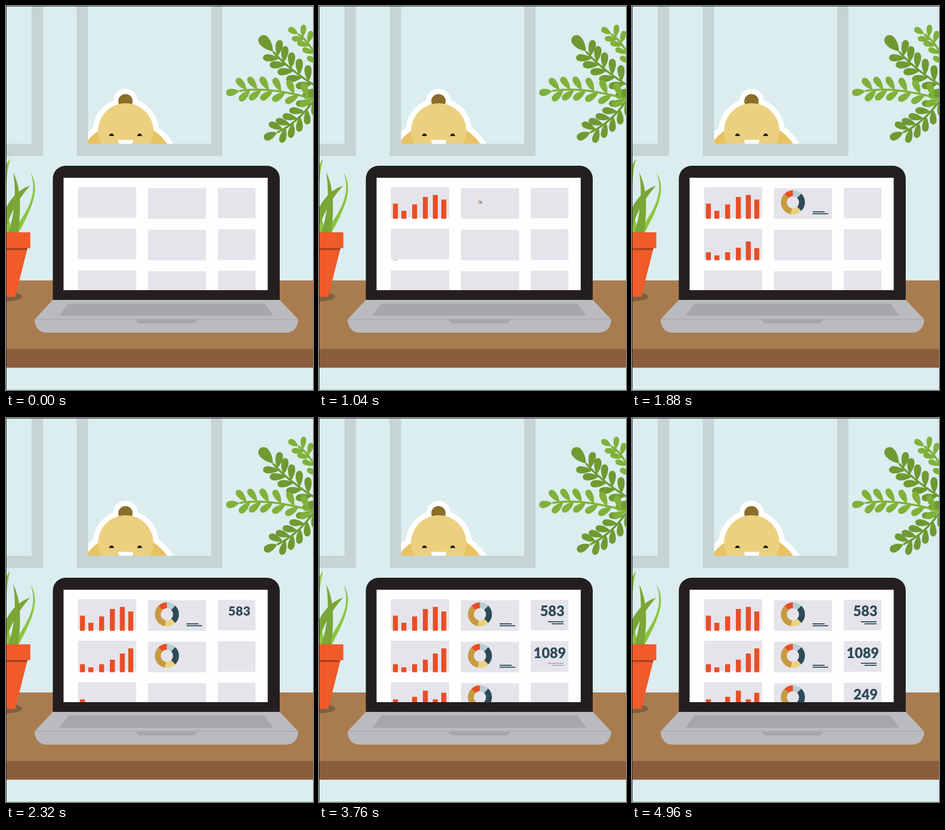
An HTML page for the animation above (5000 ms loop, 600 by 750 pixels).

```html
<!DOCTYPE html>
<html lang="en">
<head>
<meta charset="utf-8">
<title>Dashboard on a desk</title>
<style>
  html, body { margin: 0; width: 100%; height: 100%; overflow: hidden; background: #dbedef; }
  svg { display: block; width: 100vw; height: 100vh; }
  #dash text { font: 900 27.3px Lato, sans-serif; text-anchor: middle; fill: #2e4a59; }
  .bar, .pop { transform-box: fill-box; transform-origin: center; }
  .bar { transform-origin: bottom; fill: #e84e26; }
  .rule { stroke: #2e4a59; stroke-width: 2; fill: none; }
  .card { fill: #e5e4ea; }
</style>
</head>
<body>
<svg viewBox="0 0 600 750">
  <defs>
    <clipPath id="pane"><path d="M160.500 0H401V269H160.500Z"/></clipPath>
    <clipPath id="screen"><path d="M112.500 335.500H511.500V555H112.500Z"/></clipPath>
  </defs>
  <rect width="600" height="750" fill="#dbedef"/>

  <!-- windows -->
  <path fill="#c5d5d5" d="M50 0H72.500V293H0V269H50ZM138 0H160.500V269H401V0H423V293H138Z"/>

  <!-- visitor -->
  <g clip-path="url(#pane)">
    <g fill="#fff">
      <circle cx="234.500" cy="324" r="108"/>
      <circle cx="234" cy="244" r="64.500"/>
      <circle cx="233.500" cy="185.500" r="24"/>
    </g>
    <circle cx="235" cy="324" r="97" fill="#e8c262"/>
    <circle cx="233.500" cy="186" r="14" fill="#8a6e2a"/>
    <circle cx="234" cy="244" r="54" fill="#ecd080"/>
    <path fill="#231f20" d="M201.500 254a4.700 5 0 0 1 9.400 0ZM256.500 254a4.700 5 0 0 1 9.400 0Z"/>
    <path fill="#fff" d="M219 261.500H249Q247 277 234 277T219 261.500Z"/>
  </g>

  <g id="fern"></g>

  <!-- desk -->
  <path fill="#a97c50" d="M0 536H600V670H0Z"/>
  <path fill="#8b5d3c" d="M0 670H600V706.500H0Z"/>

  <!-- potted grass -->
  <ellipse cx="-5" cy="567.500" rx="37" ry="9.500" fill="#7f6040"/>
  <path fill="#8bc53f" d="M8 299Q1 322 1 356L0 358V312Q3 304 8 299ZM0 396Q7 420 12 442H0Z"/>
  <path fill="#7aa637" d="M47 351Q18 360 0 394V431Q17 384 47 351Z"/>
  <path fill="#8bc53f" d="M48 325C65 354 57 384 25 442H13C36 406 65 372 48 325Z"/>
  <path fill="#7aa637" d="M14 325C29 354 30 392 24 442H5C18 402 20 362 14 325Z"/>
  <path fill="#f15a29" d="M0 442H47.500V473H42L18 568H0Z"/>
  <path fill="#a5401f" d="M0 473H42L41 476.500H0Z"/>

  <!-- laptop -->
  <path fill="#231f20" d="M91.500 574V337A25 25 0 0 1 116.500 312H510A25 25 0 0 1 535 337V574Z"/>
  <path fill="#fffefe" d="M112.500 335.500H511.500V555H112.500Z"/>
  <path fill="#babbbf" d="M91.500 574H535L571 612V615Q568 638 546 638H81Q59 638 56 615V612Z"/>
  <path fill="#a6a7ab" d="M122 581H505L522.500 605H104Z"/>
  <path stroke="#a6a8ab" stroke-width="1.500" d="M56 612H571"/>
  <path fill="#a5a7aa" d="M254 612H373Q372 620 364 620H263Q255 620 254 612Z"/>

  <g id="dash" clip-path="url(#screen)"></g>

  <path fill="none" stroke="#222" d="M600 .5H.5V750"/>
  <path stroke="#aab6b7" d="M0 749.500H600"/>
</svg>

<script>
const LOOP = 5000, STEP = 1000, ROW = 81;
const DARK = '#6f9a32', LIGHT = '#80b13b';
const fern = document.getElementById('fern');
const dash = document.getElementById('dash');

function add(parent, tag, attrs, text) {
  const el = document.createElementNS('http://www.w3.org/2000/svg', tag);
  for (const k in attrs) el.setAttribute(k, attrs[k]);
  if (text) el.textContent = text;
  parent.append(el);
  return el;
}

// Moves a property between two values once per loop, holding before and after.
function reveal(el, prop, from, to, start, length, easing) {
  el.animate([
    { [prop]: from, offset: 0 },
    { [prop]: from, offset: start / LOOP, easing },
    { [prop]: to, offset: (start + length) / LOOP },
    { [prop]: to, offset: 1 }
  ], { duration: LOOP, iterations: Infinity });
}

function leaf(x, y, angle, l, w, fill) {
  add(fern, 'path', {
    fill,
    transform: `translate(${x} ${y}) rotate(${angle})`,
    d: `M0 0C${l * .2} ${-w * .5} ${l * .4} ${-w} ${l * .7} ${-w}` +
       `C${l * 1.1} ${-w} ${l * 1.1} ${w} ${l * .7} ${w}` +
       `C${l * .4} ${w} ${l * .2} ${w * .5} 0 0`
  });
}

// A quadratic stem from tip to root with staggered leaves on both sides.
function frond([x0, y0, x1, y1, x2, y2], pairs, size, tip, fill) {
  const mix = (a, b, c, t) => (1 - t) ** 2 * a + 2 * t * (1 - t) * b + t * t * c;
  const at = t => {
    const dx = (1 - t) * (x0 - x1) + t * (x1 - x2);
    const dy = (1 - t) * (y0 - y1) + t * (y1 - y2);
    return [mix(x0, x1, x2, t), mix(y0, y1, y2, t), Math.atan2(dy, dx) * 180 / Math.PI];
  };
  add(fern, 'path', {
    d: `M${x0} ${y0}Q${x1} ${y1} ${x2} ${y2}`, fill: 'none', stroke: fill, 'stroke-width': 4
  });
  leaf(...at(0), tip, tip * .27, fill);
  for (let i = 0; i < pairs; i++) {
    const [ax, ay, a] = at((i + .75) / pairs);
    const [bx, by, b] = at((i + 1.1) / pairs);
    leaf(ax, ay, a + 54, size, size * .22, fill);
    leaf(bx, by, b - 42, size, size * .22, fill);
  }
}

frond([522, 89, 550, 122, 606, 157], 5.5, 32, 39, DARK);
frond([530, 247, 572, 228, 606, 178], 5.5, 30, 28, DARK);
frond([571, 55, 592, 68, 606, 100], 3.5, 25, 22, LIGHT);
frond([456, 166, 515, 156, 606, 183], 6.3, 30, 26, LIGHT);

const bars = [
  [29.5, 15.5, 28, 42.5, 46.5, 37.5],
  [15.5, 9.5, 15.5, 24.5, 36.5, 46.5],
  [28, 12, 33, 45, 28, 41]
];
const barX = [144.5, 161, 182, 203, 222.5, 239];
const slices = [
  [0, 44, '#b7cfd3'], [44, 136, '#2e4a59'], [136, 190, '#ecd080'],
  [190, 315, '#c79a41'], [315, 360, '#e84e26']
];
const totals = [['583', 456], ['1089', 451], ['249', 456.5]];

function donut(cy) {
  const g = add(dash, 'g', { class: 'pop' });
  for (const [from, to, stroke] of slices) {
    add(g, 'circle', {
      cx: 314.5, cy, r: 17.7, fill: 'none', stroke, 'stroke-width': 11.6,
      pathLength: 360, 'stroke-dasharray': `${to - from} 360`,
      transform: `rotate(${from - 90} 314.5 ${cy})`
    });
  }
  return g;
}

for (let r = 0; r < 3; r++) {
  const y = r * ROW, start = r * STEP;
  for (const [x, top, width] of [[140.5, 354, 114], [277.5, 356, 113.5], [414, 355, 73.5]])
    add(dash, 'rect', { class: 'card', x, y: top + y, width, height: 59.7 });

  bars[r].forEach((height, i) => {
    const bar = add(dash, 'rect', { class: 'bar', x: barX[i], y: 415.5 + y - height, width: 9.7, height });
    reveal(bar, 'transform', 'scaleY(0)', 'scaleY(1)', start + i * 152, 240, 'ease-in-out');
  });

  const next = start + STEP;
  reveal(donut(383.5 + y), 'transform', 'scale(0)', 'scale(1)', next, 320, 'ease');
  const notes = add(dash, 'path', { class: 'rule', d: `M353 ${402 + y}h23.500M353 ${405.7 + y}h30.500` });
  reveal(notes, 'opacity', 0, 1, next + 500, 300, 'ease-in-out');

  const [label, x] = totals[r];
  const total = add(dash, 'text', { class: 'pop', x, y: 387 + y + (r ? 1 : 0) }, label);
  reveal(total, 'transform', 'scale(0)', 'scale(1)', next + STEP, 500, 'ease');
  const caption = add(dash, 'path', { class: 'rule', d: `M447.500 ${398 + y}h30.500M454.500 ${402 + y}h23.500` });
  reveal(caption, 'opacity', 0, 1, next + STEP + 650, 280, 'ease-in-out');
}
</script>
</body>
</html>
```
